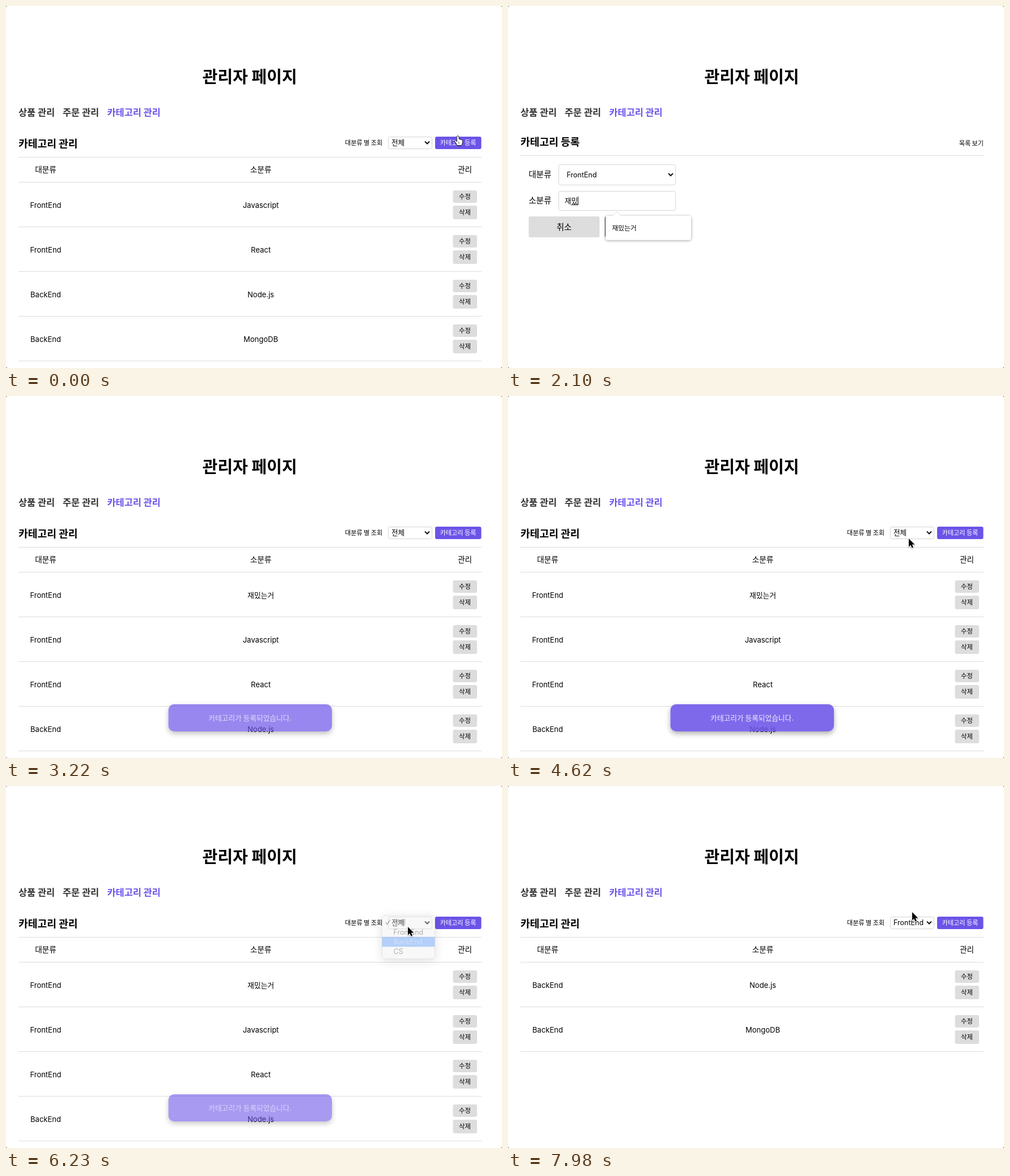
Animation, 875 px wide and 640 px high, one loop 8000 ms. Source, as an HTML page with a canvas:

```html
<!DOCTYPE html>
<html lang="ko">
<head>
<meta charset="utf-8">
<style>
html, body { margin: 0; width: 100%; height: 100%; overflow: hidden; background: #fff; }
canvas { display: block; }
</style>
</head>
<body>
<canvas id="stage" width="875" height="640"></canvas>
<script>
const ctx = document.getElementById('stage').getContext('2d');
const LOOP = 8000;
const KR = '"Noto Sans CJK KR", "Noto Sans CJK JP", "Noto Sans CJK", sans-serif';
const LATIN = `Inter, ${KR}`;
const PURPLE = '#6c53e8', LINE = '#dcdcdc', GREY = '#ddd', INK = '#000';
const ITEMS = ['전체', 'FrontEnd', 'BackEnd', 'CS'];
const ITEM_H = 17.4;

const ROWS = [
  ['FrontEnd', '재밌는거'], ['FrontEnd', 'Javascript'], ['FrontEnd', 'React'],
  ['BackEnd', 'Node.js'], ['BackEnd', 'MongoDB']
];

// time, typed text, suggestion shown
const TYPING = [
  [0, '', false], [1050, '', true], [1330, 'ㅈ', false], [1470, '재', true],
  [1680, '재ㅁ', false], [1820, '재미', false], [2030, '재밌', true],
  [2240, '재밌ㄴ', false], [2310, '재밌느', false], [2450, '재밌는', true],
  [2590, '재밌는ㄱ', false], [2660, '재밌는거', true]
];

// time, x, y of the pointer tip
const PATH = [
  [0, 797, 230], [70, 797, 230], [840, 232, 334], [910, 232, 334], [1120, 229, 350],
  [3700, 229, 367], [4550, 706, 251], [4620, 707, 252], [5600, 707, 252],
  [5740, 714, 268], [5880, 719, 273], [6020, 719, 273], [6230, 709, 249],
  [6860, 709, 249], [7350, 713, 225], [7420, 713, 223], [8000, 713, 223]
];

const clamp = v => Math.max(0, Math.min(1, v));
const ramp = (t, a, b) => clamp((t - a) / (b - a));
const ease = p => 1 - Math.pow(1 - p, 2.3);
const smooth = p => p * p * (3 - 2 * p);

function text(str, x, y, size, { color = INK, weight = 400, align = 'left' } = {}) {
  ctx.font = `${weight} ${size}px ${/[A-Za-z]/.test(str) ? LATIN : KR}`;
  ctx.fillStyle = color;
  ctx.textAlign = align;
  ctx.fillText(str, x, y + size * 0.37);
}

function box(x, y, w, h, r, fill, stroke) {
  ctx.beginPath();
  ctx.roundRect(x, y, w, h, r);
  if (fill) { ctx.fillStyle = fill; ctx.fill(); }
  if (stroke) { ctx.strokeStyle = stroke; ctx.lineWidth = 1; ctx.stroke(); }
}

function rule(y) {
  ctx.fillStyle = LINE;
  ctx.fillRect(22, y, 817, 1);
}

function polyline(points, color, width) {
  ctx.beginPath();
  points.forEach(([x, y]) => ctx.lineTo(x, y));
  ctx.strokeStyle = color;
  ctx.lineWidth = width;
  ctx.stroke();
}

const chevron = (x, y) => polyline([[x - 4, y - 2], [x, y + 2], [x + 4, y - 2]], '#111', 2);

// shadow only outside the rounded box, so translucent fills stay clean
function shadow(x, y, w, h, r, dy, blur, color) {
  ctx.save();
  ctx.beginPath();
  ctx.rect(0, 0, 875, 640);
  ctx.roundRect(x, y, w, h, r);
  ctx.clip('evenodd');
  ctx.shadowColor = color;
  ctx.shadowBlur = blur;
  ctx.shadowOffsetY = dy;
  box(x, y, w, h, r, '#fff');
  ctx.restore();
}

function header() {
  ctx.fillStyle = '#555';
  ctx.fillRect(0, 0, 875, 640);
  box(0, 0, 875, 640, 3, '#fff');
  text('관리자 페이지', 430, 125, 29.1, { weight: 700, align: 'center' });
  text('상품 관리', 22, 188, 16.4, { weight: 600, color: '#333' });
  text('주문 관리', 100, 188, 16.4, { weight: 600, color: '#333' });
  text('카테고리 관리', 178.5, 188, 16.4, { weight: 600, color: PURPLE });
}

function list(rows, choice) {
  const mid = { align: 'center' };
  text('카테고리 관리', 22, 243, 18.2, { weight: 700 });
  text('대분류 별 조회', 598, 242, 11.1);
  box(674.5, 231.5, 77, 21, 3, '#fff', '#d5d5d5');
  text(choice, 680, 241.5, choice === '전체' ? 12.6 : 12.5);
  chevron(743, 241.5);
  box(757, 231, 81.5, 22, 3, PURPLE);
  text('카테고리 등록', 797.5, 242, 11.1, { weight: 500, color: '#fff', align: 'center' });
  rule(267);
  text('대분류', 70, 289, 13.6, mid);
  text('소분류', 449.5, 289, 13.6, mid);
  text('관리', 809.5, 289, 13.6, mid);
  rule(311);
  rows.slice(0, 4).forEach(([group, name], i) => {
    const y = 312 + i * 79;
    text(group, 70, y + 40, 13, mid);
    text(name, 449.5, y + 40, name === '재밌는거' ? 12.8 : 13, mid);
    box(788.5, y + 14, 42.5, 22, 3, GREY);
    box(788.5, y + 41, 42.5, 24, 3, GREY);
    text('수정', 809.5, y + 25, 11.3, { weight: 500, align: 'center' });
    text('삭제', 809.5, y + 53, 11.3, { weight: 500, align: 'center' });
    rule(y + 78);
  });
}

function form(t) {
  const [, typed, hint] = TYPING.filter(s => s[0] <= t).pop();
  text('카테고리 등록', 22, 240, 18.2, { weight: 700 });
  text('목록 보기', 839, 242.5, 11.1, { align: 'right' });
  rule(264);
  text('대분류', 36.5, 298, 14.5);
  box(89.5, 280.5, 206, 36, 3, '#fff', '#d5d5d5');
  text('FrontEnd', 103.5, 298.5, 12.5);
  chevron(287, 298);
  text('소분류', 36.5, 344, 14.5);
  box(89.5, 327.5, 206, 34, 3, '#fff', '#d5d5d5');
  text(typed, 100, 344.5, 12.6);
  const end = 100 + ctx.measureText(typed).width;
  ctx.fillStyle = INK;
  if (t >= 910) ctx.fillRect(Math.round(end), 337, 1, 15);
  if (typed) ctx.fillRect(end - 11.5, 351, 11.5, 1);
  box(36.5, 372, 125, 37, 3, GREY);
  text('취소', 99, 390.5, 14.4, { align: 'center' });
  box(171, 372, 125, 37, 3, '#333');
  text('등록', 233.5, 390.5, 14.4, { color: '#fff', align: 'center' });
  if (hint) suggestion();
}

function suggestion() {
  shadow(172, 371, 151, 42.5, 4, 1, 5, 'rgba(0,0,0,.4)');
  box(172, 371, 151, 42.5, 4, '#fff');
  ctx.beginPath();
  ctx.moveTo(184, 371.5);
  ctx.lineTo(192, 363.5);
  ctx.lineTo(200, 371.5);
  ctx.fillStyle = '#fff';
  ctx.fill();
  ctx.strokeStyle = '#e2e2e2';
  ctx.lineWidth = 1;
  ctx.stroke();
  text('재밌는거', 183.5, 392.5, 11.8);
}

function toast(alpha) {
  if (alpha <= 0) return;
  ctx.save();
  ctx.globalAlpha = alpha;
  shadow(286.5, 545, 288.5, 48, 10, 4, 10, 'rgba(0,0,0,.36)');
  box(286.5, 545, 288.5, 48, 10, PURPLE);
  text('카테고리가 등록되었습니다.', 430.5, 569, 12.7, { weight: 500, color: '#fff', align: 'center' });
  ctx.restore();
}

function menu(top, checked, hover, alpha) {
  ctx.save();
  ctx.globalAlpha = alpha;
  shadow(663, top - 3.5, 94, 77, 5, 4, 18, 'rgba(0,0,0,.3)');
  box(663.5, top - 3, 93, 76.5, 5, '#ececec', '#c4c4c4');
  ITEMS.forEach((item, i) => {
    const y = top + ITEM_H * (i + 0.5);
    const on = i === hover;
    const color = on ? '#fff' : '#3c3c3c';
    if (on) {
      ctx.fillStyle = '#4c90fa';
      ctx.fillRect(663.5, y - ITEM_H / 2, 93, ITEM_H);
    }
    text(item, 683.5, y, i ? 12.4 : 11.9, { color });
    if (i === checked) polyline([[670, y + 0.5], [672.5, y + 4], [677.5, y - 4]], color, 1.4);
  });
  ctx.restore();
}

// one opening of the select: hover follows the pointer, then blink and fade
function dropdown(t, open, click, top, checked, picked, y) {
  if (t < open || t >= click + 265) return;
  const blink = t >= click && t < click + 70;
  const hover = t < click ? Math.floor((y - top) / ITEM_H) : blink ? -1 : picked;
  menu(top, checked, hover, 1 - ramp(t, click + 120, click + 270));
}

function pointerAt(t) {
  const i = PATH.findIndex(k => k[0] > t);
  const [t0, x0, y0] = PATH[i - 1], [t1, x1, y1] = PATH[i];
  const p = smooth(ramp(t, t0, t1));
  return [x0 + (x1 - x0) * p, y0 + (y1 - y0) * p];
}

const ARROW = new Path2D('M0 0V14.6L3.3 11.5L5.5 16.6L8 15.5L5.8 10.6H10.4Z');
const HAND = new Path2D('M-1.5 1Q0 -1 1.4 1L2 6Q3.5 4.8 4.5 6.4Q6 5.6 6.7 7.2Q8.4 6.8 8.4 8.8' +
  'L7.5 13.5L6.5 16H-.8L-2 13.5L-5.2 9.8Q-5.4 7.8 -3.4 8.4L-1 10.2Z');

function pointer(x, y, kind) {
  ctx.save();
  ctx.translate(x, y);
  ctx.lineJoin = 'round';
  if (kind === 'beam') {
    for (const [color, width] of [['#fff', 3], ['#222', 1]]) {
      polyline([[-3, -8], [0, -7], [0, 8], [-3, 9]], color, width);
      polyline([[3, -8], [0, -7], [0, 8], [3, 9]], color, width);
    }
  } else {
    const hand = kind === 'hand', shape = hand ? HAND : ARROW;
    ctx.shadowColor = 'rgba(0,0,0,.35)';
    ctx.shadowBlur = 2;
    ctx.shadowOffsetY = 1;
    ctx.strokeStyle = hand ? '#000' : '#fff';
    ctx.lineWidth = hand ? 1.4 : 2;
    ctx.stroke(shape);
    ctx.shadowColor = 'transparent';
    ctx.fillStyle = hand ? '#fff' : '#000';
    ctx.fill(shape);
    if (hand) polyline([[1.9, 10], [2.1, 13.5]], '#000', 0.8);
  }
  ctx.restore();
}

function draw(t) {
  const [x, y] = pointerAt(t);
  const onForm = t >= 140 && t < 3010;
  header();
  if (onForm) form(t);
  else {
    const rows = t < 140 ? ROWS.slice(1) : t < 6580 ? ROWS : ROWS.slice(3);
    list(rows, t < 6300 ? '전체' : t < 7840 ? 'BackEnd' : 'FrontEnd');
    toast(0.87 * (ease(ramp(t, 3080, 3360)) - ease(ramp(t, 6185, 6485))));
    dropdown(t, 4760, 6020, 232, 0, 2, y);
    dropdown(t, 6930, 7560, 197.2, 2, 1, y);
  }
  if (t >= 1330 && t < 3780) return;
  const overButton = !onForm && x > 757 && y < 253;
  const overInput = onForm && x > 90 && x < 296 && y > 327 && y < 362;
  pointer(x, y, overButton ? 'hand' : overInput ? 'beam' : 'arrow');
}

const start = performance.now();
function tick() {
  draw((performance.now() - start) % LOOP);
  requestAnimationFrame(tick);
}
tick();
</script>
</body>
</html>
```
